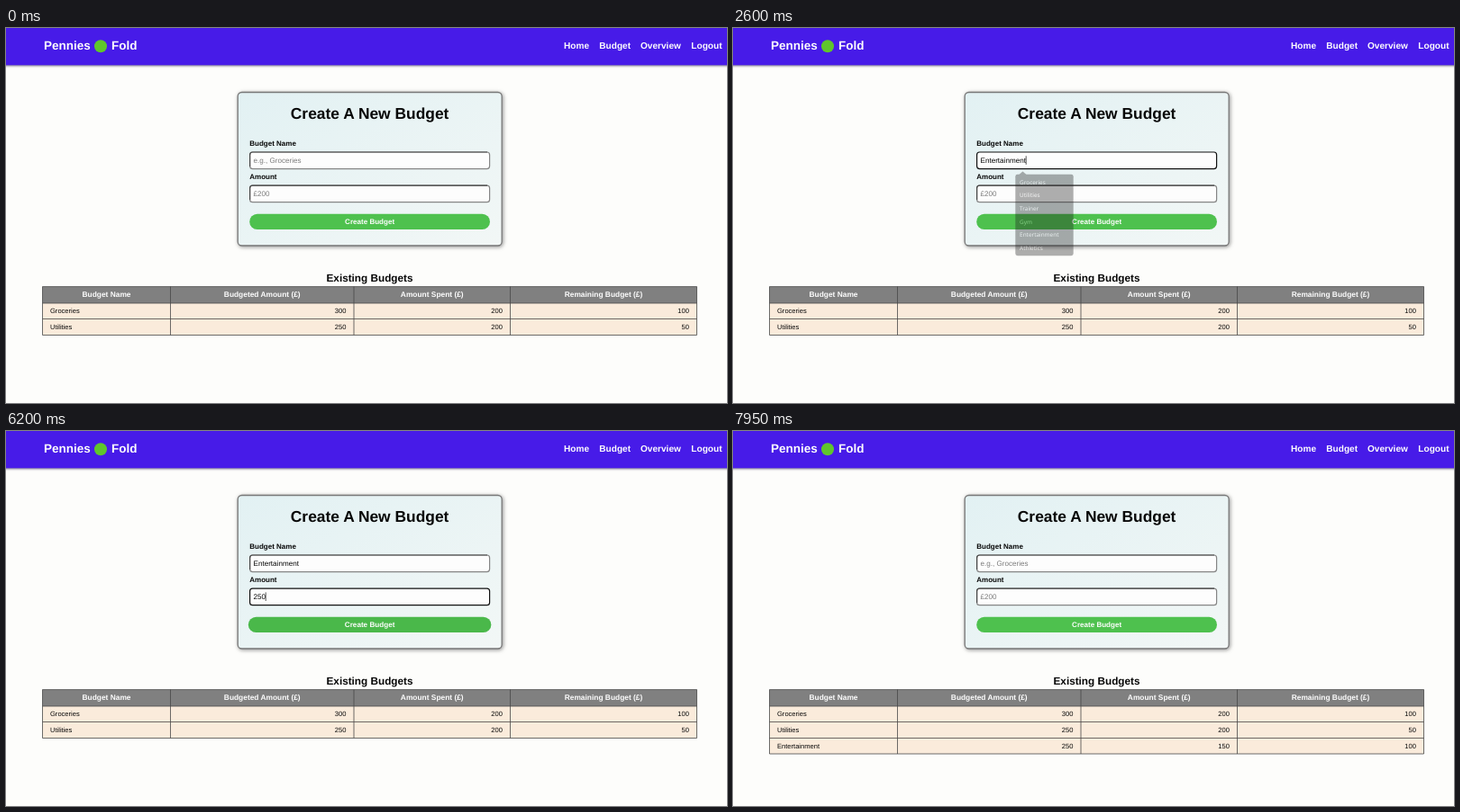
Animation, 800 px wide and 417 px high, one loop 8 s. Source, as an HTML page:

```html
<!DOCTYPE html>
<html lang="en">
<head>
<meta charset="utf-8">
<title>Create A New Budget</title>
<style>
  html, body { margin: 0; width: 100%; height: 100%; overflow: hidden; background: #fdfdfb; }
  svg { display: block; width: 100%; height: 100%; }
  text { font-family: "Liberation Sans", Arial, sans-serif; fill: #080808; text-rendering: geometricPrecision; }
  .bold { font-weight: bold; }
  .light { fill: #fdfdfd; }
  .hint { fill: #7c7c7c; }
  .menu text { font-family: "Noto Sans", sans-serif; font-size: 6.65px; fill: #e8e8e8; }
  .card { filter: drop-shadow(1px 1.5px 2px rgba(60, 60, 60, .55)); }
  .bar { filter: drop-shadow(0 1px 1px rgba(40, 30, 70, .6)); }
</style>
</head>
<body>
<svg id="stage" viewBox="0 0 800 417" xmlns="http://www.w3.org/2000/svg">
  <defs>
    <linearGradient id="mist" x1="0" y1="0" x2="1" y2="1">
      <stop offset="0" stop-color="#e2f1f3"/>
      <stop offset="1" stop-color="#f2f7f6"/>
    </linearGradient>
  </defs>
  <g id="page"></g>
  <g id="live"></g>
</svg>
<script>
const LOOP = 8000;
const NAMES = ["Groceries", "Utilities", "Trainer", "Gym", "Entertainment", "Athletics"];
const AMOUNTS = ["250", "50", "500", "200", "45", "275"];
const COLUMNS = [40.5, 182.5, 386, 559.5, 766.5];
const HEADINGS = ["Budget Name", "Budgeted Amount (£)", "Amount Spent (£)", "Remaining Budget (£)"];
const ROWS = [["Groceries", 300, 200, 100], ["Utilities", 250, 200, 50], ["Entertainment", 250, 150, 100]];
const ROW_TOPS = [306, 323.5, 341.5, 359];

// Each step overrides the state left by the steps before it.
const BLANK = { name: "", amount: "", focus: "", caret: 0, items: [], fade: 0, pick: -1, rows: 2, logo: true };
const STEPS = [
  [1050, { focus: "name", caret: 1, items: NAMES, fade: 1 }],
  [1600, { caret: 0 }],
  [2200, { caret: 1 }],
  [2450, { pick: 4 }],
  [2550, { name: "Entertainment", fade: .75, pick: -1 }],
  [2600, { fade: .35 }],
  [2650, { fade: .12 }],
  [2700, { fade: 0 }],
  [3050, { focus: "amount" }],
  [3150, { items: AMOUNTS, fade: .5 }],
  [3200, { fade: 1 }],
  [3750, { caret: 0 }],
  [4100, { amount: "2", caret: 1, items: AMOUNTS.filter(a => a.includes("2")) }],
  [4550, { pick: 0 }],
  [4650, { amount: "250" }],
  [4700, { fade: .9, pick: -1 }],
  [4750, { fade: .7 }],
  [4800, { fade: .35 }],
  [4850, { fade: .12 }],
  [4900, { fade: 0 }],
  [5250, { caret: 0 }],
  [5850, { caret: 1 }],
  [6450, { caret: 0 }],
  [6750, { focus: "" }],
  [6950, { ...BLANK, rows: 3, logo: false }],
  [7000, { logo: true }]
];

// Button hover: start, duration, from, to.
const HOVERS = [[0, 1, 0, 0], [5950, 500, 0, 1], [6950, 400, 0, 1], [7450, 500, 1, 0]];

const text = (x, y, size, words, kind = "", anchor = "start") =>
  `<text x="${x}" y="${y}" font-size="${size}" class="${kind}" text-anchor="${anchor}">${words}</text>`;
const rect = (x, y, w, h, fill, more = "") =>
  `<rect x="${x}" y="${y}" width="${w}" height="${h}" fill="${fill}" ${more}/>`;
const line = (d, colour, width = 1) =>
  `<path d="${d}" fill="none" stroke="${colour}" stroke-width="${width}"/>`;

function drawPage() {
  const nav = [[619, "Home"], [658.3, "Budget"], [704, "Overview"], [760.3, "Logout"]];
  return rect(0, 0, 800, 417, "#fdfdfb")
    + rect(-5, -5, 810, 46.3, "#471be8", 'class="bar"')
    + nav.map(([x, word]) => text(x, 23.4, 10.1, word, "bold light")).join("")
    + rect(257.2, 71.5, 293, 170.5, "url(#mist)", 'rx="4.5" stroke="#787878" stroke-width="1.3" class="card"')
    + text(403.6, 100.9, 17.4, "Create A New Budget", "bold", "middle")
    + text(270.3, 131.2, 8, "Budget Name", "bold")
    + text(270.3, 168.2, 8, "Amount", "bold")
    + text(403.5, 282.1, 11.75, "Existing Budgets", "bold", "middle");
}

function drawField(top, value, hint, focused, caret) {
  const edge = focused ? "#101010" : "#858585";
  const caretX = value === "Entertainment" ? 325.2 : 274.7 + value.length * 4.5;
  return rect(270.6, top, 266, 18.6, "#fdfdfd", `rx="3" stroke="${edge}" stroke-width="1.2"`)
    + (focused ? "" : line(`M270.6 ${top + 16}V${top + 3}q0-3 3-3H534`, "#484848", 1.2))
    + text(274.5, top + 12, 8.1, value || hint, value ? "" : "hint")
    + (focused && caret ? line(`M${caretX} ${top + 4.3}v9.6`, "#111", .7) : "");
}

function drawButton(hover) {
  const mix = (from, to) => Math.round(from + (to - from) * hover);
  const fill = `rgb(${mix(78, 69)},${mix(193, 174)},${mix(78, 70)})`;
  return `<g transform="translate(403.6 215.4) scale(${1 + .02 * hover})">`
    + rect(-133.4, -8.6, 266.8, 17.2, fill, 'rx="8.6"')
    + text(0, 2.8, 8.05, "Create Budget", "bold light", "middle") + "</g>";
}

function drawTable(count) {
  const left = COLUMNS[0], right = COLUMNS[4], bottom = ROW_TOPS[count];
  let out = rect(left, 287.7, right - left, 18.3, "#808080")
    + rect(left, 306, right - left, bottom - 306, "#faebdb");
  HEADINGS.forEach((words, i) =>
    out += text((COLUMNS[i] + COLUMNS[i + 1]) / 2, 299.4, 8.4, words, "bold light", "middle"));
  ROWS.slice(0, count).forEach((row, r) => row.forEach((cell, i) => {
    const y = ROW_TOPS[r] + 11.3;
    out += i ? text(COLUMNS[i + 1] - 8.6, y, 7.55, cell, "", "end") : text(49, y, 7.55, cell);
  }));
  COLUMNS.forEach(x => out += line(`M${x} 287.5V${bottom}`, "#484848", .8));
  [287.6, ...ROW_TOPS.slice(0, count + 1)].forEach(y => out += line(`M${left} ${y}H${right}`, "#484848", .8));
  return out;
}

function drawMenu({ items, fade, pick, focus }) {
  if (!fade) return "";
  const top = focus === "name" ? 161 : 198;
  const width = focus === "name" ? 67 : 66;
  const height = 3.4 + items.length * 15.1;
  const cx = 312 + width / 2, cy = top + height / 2;
  const scale = .94 + .06 * fade;
  return `<g class="menu" opacity="${fade}" transform="translate(${cx} ${cy}) scale(${scale}) translate(${-cx} ${-cy})">`
    + `<path d="M316 ${top + .5}l4.5-4 4.5 4z" fill="#1c1c1c"/>`
    + rect(312, top, width, height, "#1c1c1c", 'rx="2.5"')
    + (pick < 0 ? "" : rect(313.5, top + 1.7 + pick * 15.1, width - 3, 15.1, "#3c3c3c", 'rx="2"'))
    + items.map((item, i) => text(317, top + 11.6 + i * 15.1, 6.65, item)).join("") + "</g>";
}

function drawBrand(logo) {
  if (!logo) return text(42, 24, 13.5, "PenniesFold", "bold light");
  return text(42, 24, 13.5, "Pennies", "bold light")
    + '<circle cx="105" cy="20.3" r="7" fill="#5fc62c"/>'
    + text(117, 24, 13.5, "Fold", "bold light");
}

function hoverAt(t) {
  const [start, span, from, to] = HOVERS.filter(([at]) => at <= t).pop();
  const p = Math.min(1, (t - start) / span);
  return from + (to - from) * p * p * (3 - 2 * p);
}

function draw(t) {
  const state = Object.assign({}, BLANK, ...STEPS.filter(([at]) => at <= t).map(([, change]) => change));
  return drawBrand(state.logo)
    + drawField(138, state.name, "e.g., Groceries", state.focus === "name", state.caret)
    + drawField(175.1, state.amount, "£200", state.focus === "amount", state.caret)
    + drawButton(hoverAt(t)) + drawTable(state.rows) + drawMenu(state);
}

const live = document.getElementById("live");
let shown = "";
function tick() {
  const t = Math.floor(performance.now() % LOOP / 50) * 50;
  const next = draw(t);
  if (next !== shown) live.innerHTML = shown = next;
  requestAnimationFrame(tick);
}
document.getElementById("page").innerHTML = drawPage();
tick();
</script>
</body>
</html>
```
